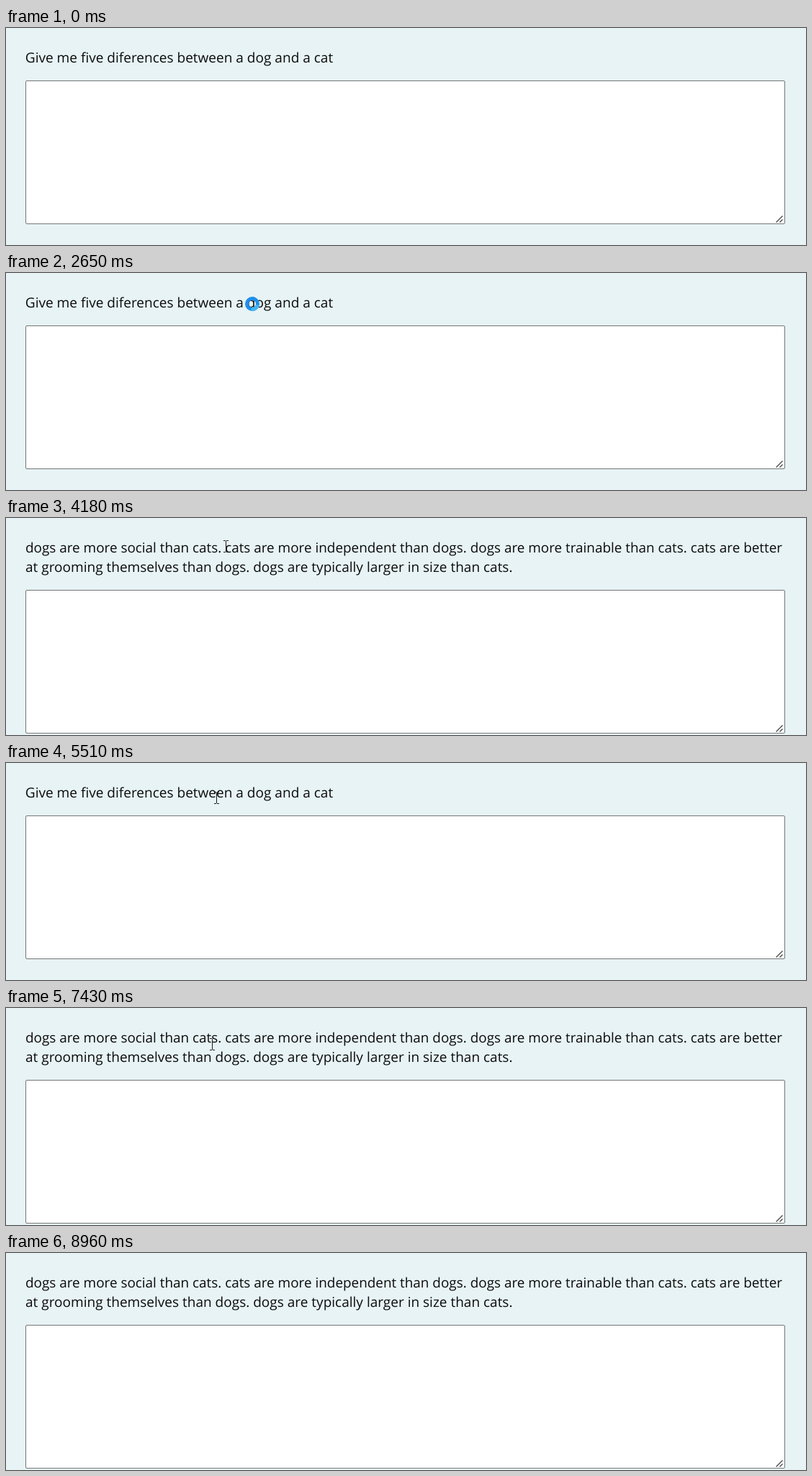
These frames come from a looping animation (1111 px wide and 302 px high, 9.76 s). An HTML page:

```html
<!DOCTYPE html>
<html lang="en">
<head>
<meta charset="utf-8">
<style>
  html, body { margin: 0; width: 100%; height: 100%; overflow: hidden; background: #e7f3f5; }
  svg { display: block; }
  text { font-family: "Open Sans", "Noto Sans", sans-serif; fill: #0c0c0c; text-rendering: geometricPrecision; }
</style>
</head>
<body>
<svg width="1111" height="302" viewBox="0 0 1111 302" fill="none">
  <text id="question" x="26.8" y="48" font-size="19.05">Give me five diferences between a dog and a cat</text>
  <g id="answer">
    <text x="27" y="48" font-size="18.9">dogs are more social than cats. cats are more independent than dogs. dogs are more trainable than cats. cats are better</text>
    <text x="27" y="75" font-size="19.03">at grooming themselves than dogs. dogs are typically larger in size than cats.</text>
  </g>
  <g id="box">
    <rect x="27.5" y="73.5" width="1054" height="199" rx="1.5" fill="#fff" stroke="#767676"/>
    <path d="M1069.5 270.5l9-9M1074.5 270.5l4-4" stroke="#4a4a4a" stroke-width="1.4"/>
  </g>
  <path id="beam" d="M-3 -7.5h3M1 -7.5h3M.5 -7v15M-3 8.5h3M1 8.5h3" stroke="#1a1a1a"/>
  <g id="spinner" stroke-width="5">
    <circle r="7.5" stroke="#1e8fea"/>
    <path id="glint" d="M-7.5 0A7.5 7.5 0 0 1 0 -7.5" stroke="#45b4f6"/>
  </g>
</svg>
<script>
const LOOP = 9760, STEP = 67, GLIDE = 750;
const ENTER = 590, LEAVE = 8960, BUSY = 2050, REPLY = 4040;
const swaps = [REPLY, 5380, 6140, 8230, 8430];

// Each stop: when the pointer sets off, and where it goes
const entry = { x: 742, y: 294 };
const stops = [
  { at: ENTER, x: 340, y: 46 },
  { at: BUSY, x: 343, y: 42 },
  { at: 3050, x: 305, y: 39 },
  { at: 4240, x: 292, y: 48 },
  { at: 7430 - STEP, x: 286, y: 50 },
  { at: 7430, x: 421, y: 52 },
  { at: 8430, x: 700, y: 294 }
];

const [question, answer, box, beam, spinner, glint] =
  ["question", "answer", "box", "beam", "spinner", "glint"].map(id => document.getElementById(id));
const show = (node, on) => node.setAttribute("visibility", on ? "visible" : "hidden");
const place = (node, transform) => node.setAttribute("transform", transform);

function pointer(t) {
  const i = stops.filter(s => t >= s.at).length - 1;
  const from = stops[i - 1] || entry, to = stops[i];
  const end = stops[i + 1] ? stops[i + 1].at : LEAVE;
  const steps = Math.floor((t - to.at) / STEP);
  const p = Math.min(1, steps * STEP / Math.min(GLIDE, end - to.at));
  const ease = p * p * (3 - 2 * p);
  const mix = key => Math.round(from[key] + (to[key] - from[key]) * ease);
  return `translate(${mix("x")} ${mix("y")})`;
}

function draw(t) {
  const answered = swaps.filter(s => t >= s).length % 2 === 1;
  show(question, !answered);
  show(answer, answered);
  place(box, `translate(0 ${answered ? 27 : 0})`);

  const present = t >= ENTER && t < LEAVE;
  const busy = t >= BUSY && t < REPLY;
  show(beam, present && !busy);
  show(spinner, busy);
  if (present) place(busy ? spinner : beam, pointer(t));
  place(glint, `rotate(${Math.floor((t - BUSY) / STEP) * 24})`);
}

const begin = performance.now();
function tick() {
  draw((performance.now() - begin) % LOOP);
  requestAnimationFrame(tick);
}
tick();
</script>
</body>
</html>
```
